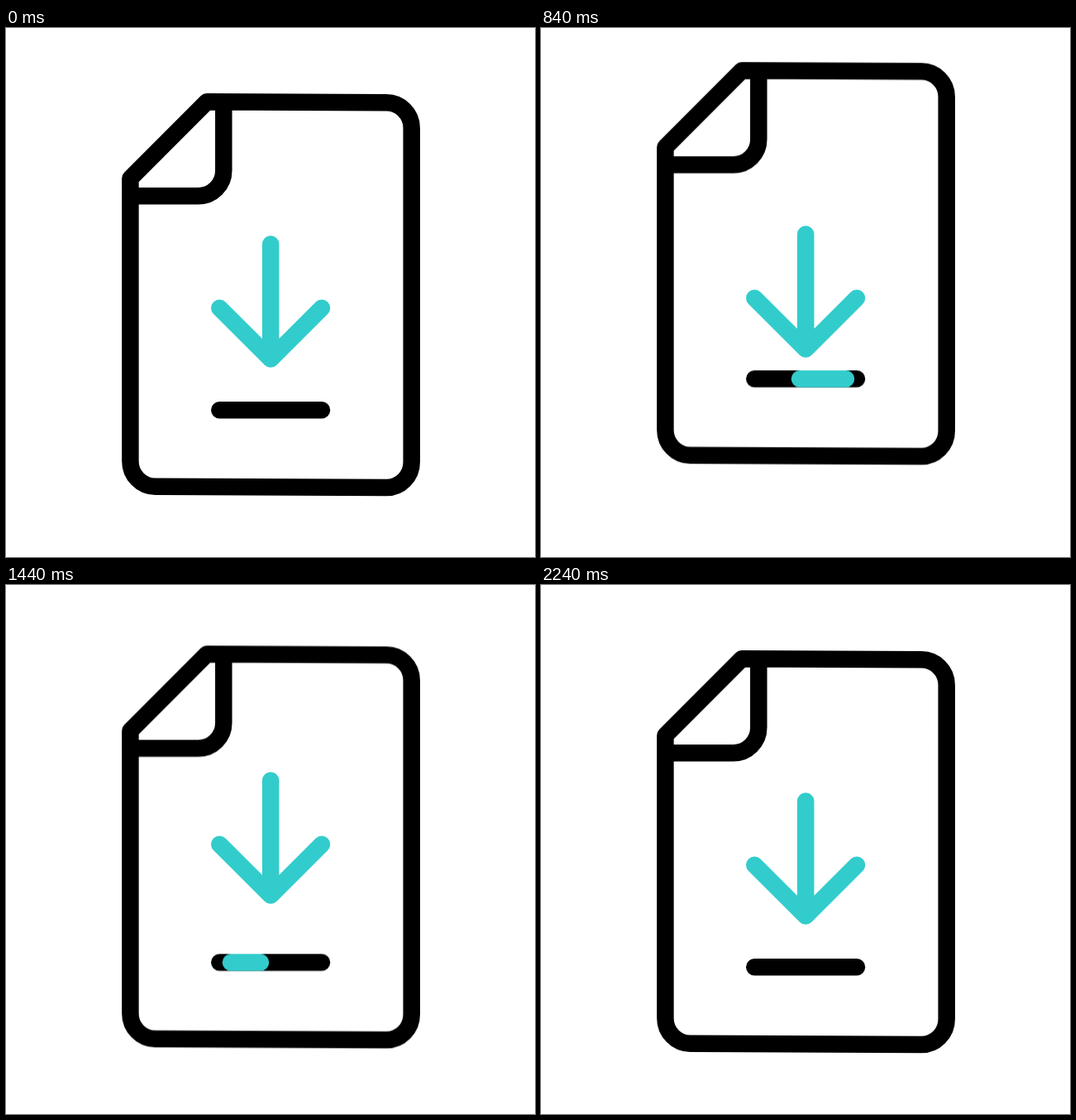
An HTML page that plays this animation: 640x640 px, repeating every 2.48 s.

```html
<!DOCTYPE html>
<html lang="en">
<head>
<meta charset="utf-8">
<title>Download file</title>
<style>
  html, body { margin: 0; width: 100%; height: 100%; overflow: hidden; background: #fff; }
  svg {
    display: block; width: 100%; height: 100%;
    fill: none; stroke: #000; stroke-width: 20.5;
    stroke-linecap: round; stroke-linejoin: round;
  }
  .teal { stroke: #3cc; }
  .doc, .arrow, .fill {
    animation-duration: 2480ms;
    animation-iteration-count: infinite;
    animation-timing-function: linear;
  }
  .doc { animation-name: lift; }
  .arrow { animation-name: rise; }
  .fill { animation-name: sweep, show; animation-timing-function: linear, step-end; }

  @keyframes lift {
    0% { transform: translateY(0); }
    11.29% { transform: translateY(0); animation-timing-function: cubic-bezier(.56, 0, .36, 1); }
    38.71% { transform: translateY(-39px); animation-timing-function: cubic-bezier(.64, 0, .44, 1); }
    66.129%, 100% { transform: translateY(0); }
  }
  @keyframes rise {
    0%, 11.29% { transform: translateY(0); }
    19.355% { transform: translateY(-5.3px); }
    33.871% { transform: translateY(-12px); }
    46.774% { transform: translateY(-18.5px); }
    58.065% { transform: translateY(-25px); }
    59.677% { transform: translateY(-25.8px); animation-timing-function: cubic-bezier(.42, 0, .325, 1); }
    90.323%, 100% { transform: translateY(0); }
  }
  /* Dash length is the visible part, dash offset the trailing end. */
  @keyframes sweep {
    0% { stroke-dasharray: 0 400; stroke-dashoffset: 0; }
    11.29% { stroke-dasharray: 0 400; stroke-dashoffset: 0; animation-timing-function: cubic-bezier(.4, 0, .75, .7); }
    19.355% { stroke-dasharray: 16 400; stroke-dashoffset: -3; animation-timing-function: cubic-bezier(.33, .38, .67, .75); }
    33.871% { stroke-dasharray: 56 400; stroke-dashoffset: -13; }
    46.774% { stroke-dasharray: 69 400; stroke-dashoffset: -25; animation-timing-function: cubic-bezier(.4, .1, .7, .65); }
    58.065% { stroke-dasharray: 36 400; stroke-dashoffset: -74; animation-timing-function: cubic-bezier(.33, .33, .6, 1); }
    66.129%, 100% { stroke-dasharray: 0 400; stroke-dashoffset: -124; }
  }
  @keyframes show {
    0% { visibility: hidden; }
    12% { visibility: visible; }
    66.1%, 100% { visibility: hidden; }
  }
</style>
</head>
<body>
<svg viewBox="0 0 640 640">
  <g class="doc">
    <path d="M150.4 182 L243 89.2 L460 90.3 A30.6 30.6 0 0 1 490.7 121 V525 A30.6 30.6 0 0 1 460 556 L180.5 554.8 A30.6 30.6 0 0 1 150.4 524 Z"/>
    <path d="M263.3 90 V172.5 A30.6 30.6 0 0 1 232.7 203.2 H151"/>
    <path d="M258.3 462.3 H382"/>
    <path class="teal fill" d="M382 462.3 H258"/>
  </g>
  <path class="teal arrow" d="M320.2 261.5 V400.6 M258.3 338.7 L320.2 400.6 L382 338.7"/>
</svg>
<script>
  // Run the keyframes at 25 pictures per second.
  const LOOP = 2480, STEP = 40;
  const motions = document.getAnimations();
  const start = performance.now();
  motions.forEach(m => m.pause());

  function tick() {
    const time = (performance.now() - start) % LOOP;
    const shown = Math.floor(time / STEP) * STEP;
    motions.forEach(m => { m.currentTime = shown; });
    requestAnimationFrame(tick);
  }
  tick();
</script>
</body>
</html>
```
